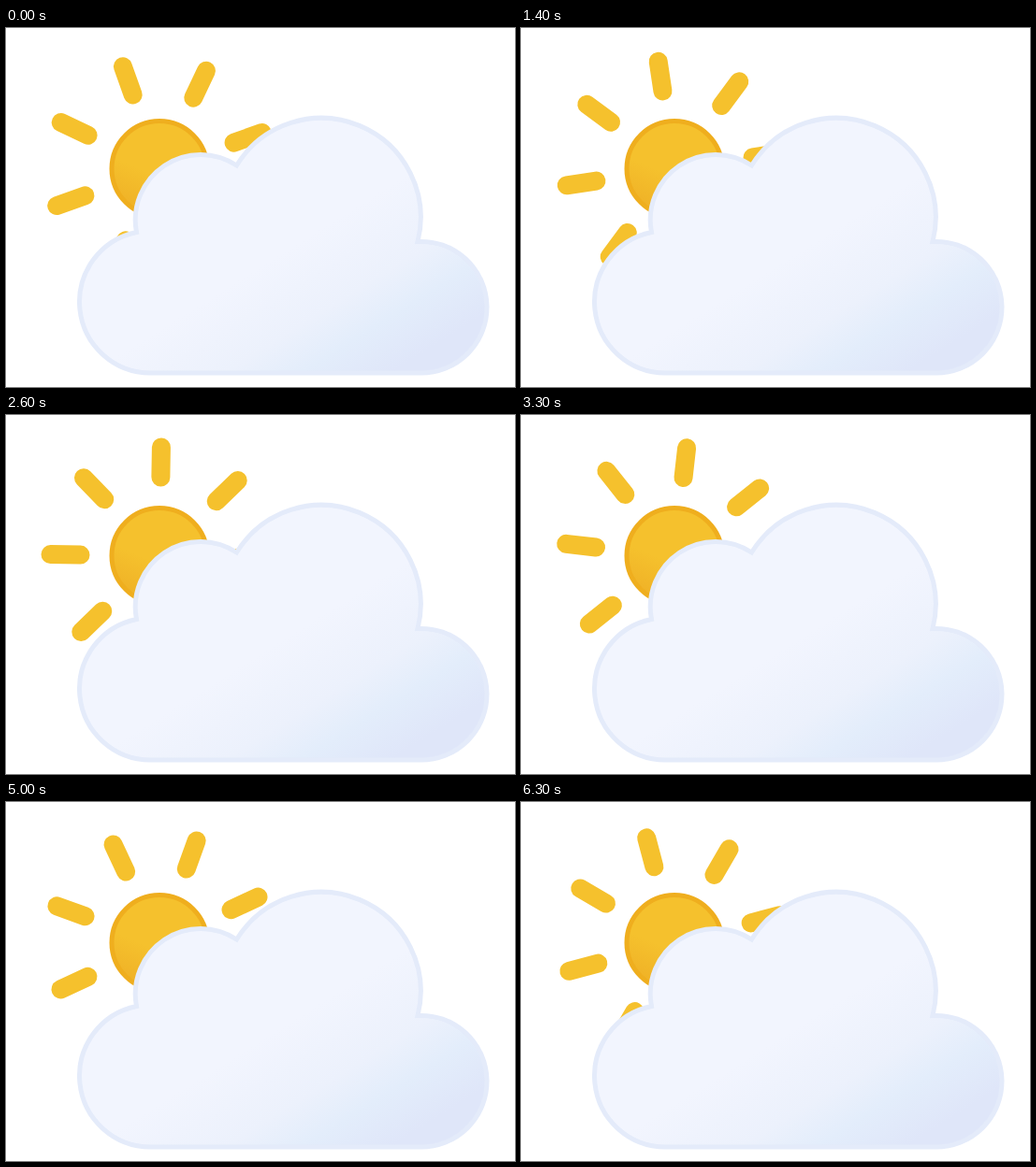
Animation, 544 px wide and 384 px high, one loop 6.4 s. Source, as an HTML page:

```html
<!DOCTYPE html>
<html lang="en">
<head>
<meta charset="utf-8">
<title>Sun behind a cloud</title>
<style>
  html, body { margin: 0; width: 100%; height: 100%; overflow: hidden; background: #fff; }
  svg { display: block; }
</style>
</head>
<body>
<svg width="544" height="384" viewBox="0 0 544 384">
  <defs>
    <linearGradient id="sky" gradientUnits="userSpaceOnUse" x1="191" y1="306" x2="281" y2="450">
      <stop offset="0" stop-color="#f2f5fe"/>
      <stop offset=".45" stop-color="#ecf1fc"/>
      <stop offset=".7" stop-color="#e3edfb"/>
      <stop offset="1" stop-color="#dfe6f9"/>
    </linearGradient>
    <linearGradient id="glow" x1=".6" y1=".3" x2=".3" y2="1">
      <stop offset=".4" stop-color="#f5c12d"/>
      <stop offset="1" stop-color="#efb026"/>
    </linearGradient>
    <line id="ray" y1="-84.5" y2="-116.5" stroke="#f5c12d" stroke-width="20" stroke-linecap="round"/>
  </defs>
  <g transform="translate(164 151)"><g id="rays"></g></g>
  <circle cx="164" cy="150.5" r="51" fill="url(#glow)" stroke="#efae1e" stroke-width="5"/>
  <path fill="url(#sky)" stroke="#e4ebfa" stroke-width="5" d="M154.5 369
    A76 76 0 0 1 139.5 218.5 A69.8 69.8 0 0 1 246.5 147
    A106.2 106.2 0 0 1 440 228.5 A70.3 70.3 0 1 1 443 369 Z"/>
  <path id="cursor" fill="#fff" stroke="#111" d="M.5 .5V16.5L4 13L6.8 19L9.6 17.8L7 12H11.8Z"/>
</svg>
<script>
  const LOOP = 6400, STEP = 100;
  const START_ANGLE = -19.6, DEGREES_PER_MS = 0.0079;
  // The pointer only flashes past: time -> tip position
  const pointer = { 1900: [-10, 124], 4200: [411, 110], 4300: [40, 71] };

  const rays = document.getElementById('rays');
  const cursor = document.getElementById('cursor');
  for (let angle = 0; angle < 360; angle += 45) {
    rays.innerHTML += `<use href="#ray" transform="rotate(${angle})"/>`;
  }

  function draw(now) {
    const t = Math.floor((now % LOOP) / STEP) * STEP;
    rays.setAttribute('transform', `rotate(${START_ANGLE + t * DEGREES_PER_MS})`);
    const tip = pointer[t];
    cursor.style.display = tip ? '' : 'none';
    if (tip) cursor.setAttribute('transform', `translate(${tip})`);
  }

  const begin = performance.now();
  function tick() {
    draw(performance.now() - begin);
    requestAnimationFrame(tick);
  }
  tick();
</script>
</body>
</html>
```
